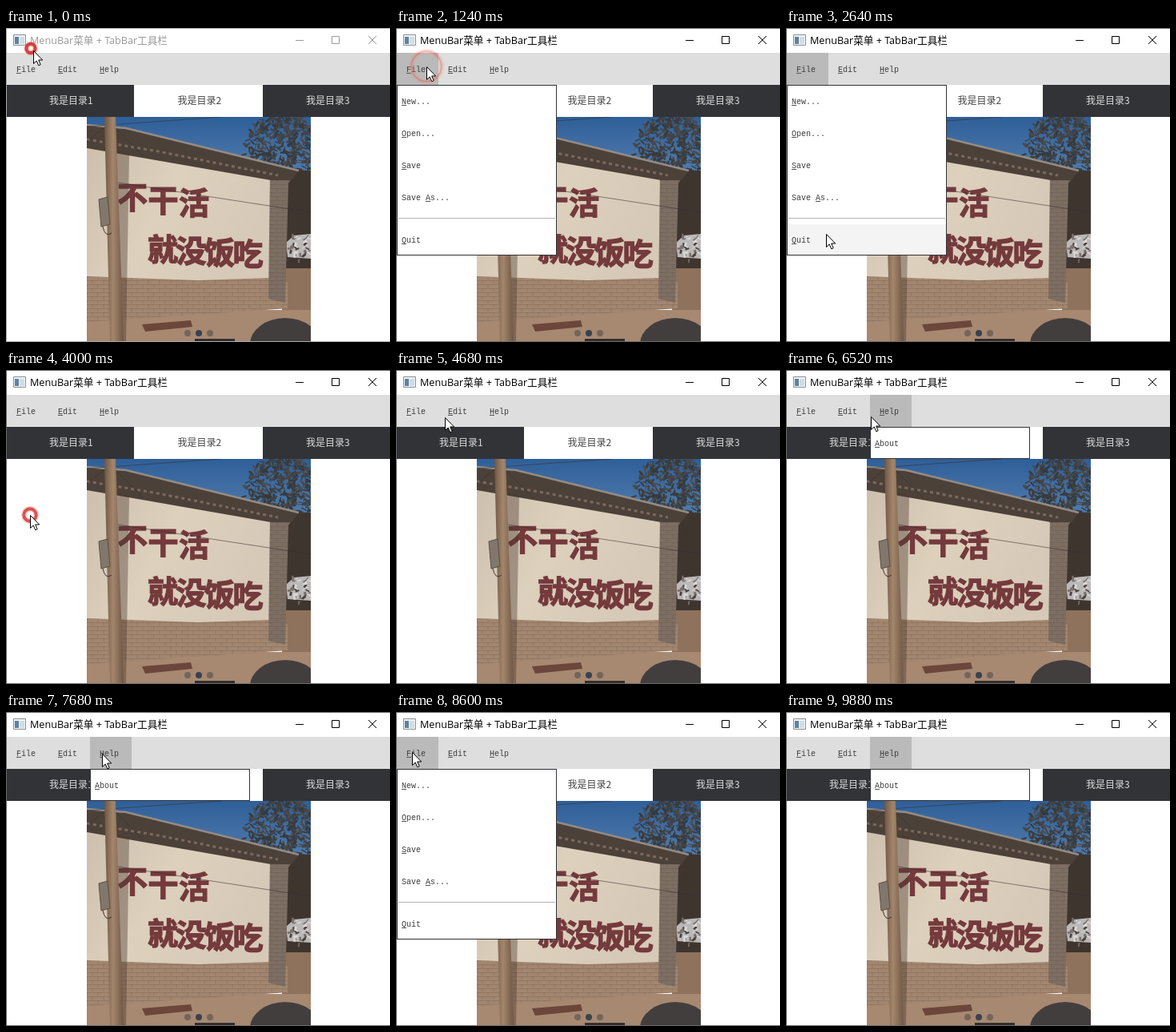
Write an HTML page that moves like this. It is 480 by 392 pixels and loops after 10000 ms.

```html
<!DOCTYPE html>
<html lang="zh">
<head>
<meta charset="utf-8">
<title>MenuBar + TabBar</title>
<style>
  html, body { margin: 0; height: 100%; overflow: hidden; background: #fff; }
  svg { display: block; width: 100vw; height: 100vh; }
  text { white-space: pre; }
  .title { font: 12.6px "Open Sans", "Noto Sans CJK SC", sans-serif; }
  .mono { font: 10px "Liberation Mono", monospace; fill: #3c3c3c; }
  .tab { font: 12px "Noto Sans CJK SC", sans-serif; }
  .slogan {
    font: 900 38px "Noto Sans CJK SC", sans-serif; text-anchor: middle;
    fill: #743a3c; stroke: #743a3c; stroke-width: 1.4;
  }
</style>
</head>
<body>
<svg viewBox="0 0 480 392">
  <defs>
    <linearGradient id="sky" x2="0" y2="1">
      <stop stop-color="#2f5f99"/><stop offset="1" stop-color="#5a84b3"/>
    </linearGradient>
    <linearGradient id="plaster" x2="1" y2=".4">
      <stop stop-color="#cdbfad"/><stop offset=".5" stop-color="#ddd0bd"/><stop offset="1" stop-color="#d6c9b7"/>
    </linearGradient>
    <linearGradient id="wood">
      <stop stop-color="#6f5644"/><stop offset=".45" stop-color="#a3866b"/><stop offset="1" stop-color="#6f5644"/>
    </linearGradient>
    <pattern id="brick" width="14" height="10" patternUnits="userSpaceOnUse">
      <path d="M0 .5H14M0 5.5H14M3 0V5M10 5V10" stroke="#5c4636" stroke-opacity=".22" fill="none"/>
    </pattern>
    <clipPath id="frame"><path d="M101 111H381V391H101Z"/></clipPath>
  </defs>

  <rect width="480" height="392" fill="#fff"/>

  <g clip-path="url(#frame)">
    <path d="M101 111H381V201H101Z" fill="url(#sky)"/>
    <g id="tree" fill="none"></g>
    <path d="M330 178H381V330H330Z" fill="#3f352f"/>
    <path d="M345 300H381V391H345Z" fill="#8f725c"/>
    <path d="M350 268L360 259 381 257V288L352 286Z" fill="#bbb8b8"/>
    <g id="rubble" fill="none"></g>
    <path d="M101 352H381V391H101Z" fill="#a78871"/>
    <path d="M101 309H330L352 318V350L101 367Z" fill="#a2866f"/>
    <path d="M101 309H330L352 318V350L101 367Z" fill="url(#brick)"/>
    <path d="M101 145L331 187 329 312 240 315 101 310Z" fill="url(#plaster)"/>
    <path d="M330 184L362 180 353 194 349 343 328 338Z" fill="#7d6e63"/>
    <path d="M330 184L362 180 353 194 349 343 328 338Z" fill="url(#brick)"/>
    <path d="M101 122L150 126 366 178 357 190H331L101 150Z" fill="#4c4139"/>
    <path d="M101 121L150 125 366 178" fill="none" stroke="#958b83" stroke-width="2.5"/>
    <path d="M101 139L190 154 340 184" fill="none" stroke="#7b695d" stroke-width="3" stroke-dasharray="4 4"/>
    <g id="slogan"></g>
    <path d="M138 152L154 156 150 391H143Z" fill="#4a392e" fill-opacity=".4"/>
    <path d="M101 123L270 111M101 142L126 122M138 126L172 160M140 193L381 230" fill="none" stroke="#33302f" stroke-width=".8" stroke-opacity=".7"/>
    <path d="M123 111H137L147 391H130Z" fill="url(#wood)"/>
    <path d="M116 214L127 211 130 245 119 248Z" fill="#82776c" stroke="#5b4f46"/>
    <path d="M121 248Q124 262 132 256" fill="none" stroke="#3c3531"/>
    <path d="M170 370L231 365 233 373 174 379Z" fill="#6b463a"/>
    <path d="M236 388H286V391H236Z" fill="#332e2d"/>
    <ellipse cx="349" cy="395" rx="44" ry="33" fill="#433e3e"/>
  </g>
  <g id="dots"></g>
  <g id="bar"></g>
  <g id="popups"></g>

  <g fill="none">
    <path id="edge" d="M0 .5H480M.5 0V392M0 391.5H480"/>
    <path id="buttons" d="M362 15.5H372M407.5 10.5H416.5V19.5H407.5ZM453 10L463 20M463 10L453 20"/>
  </g>
  <path d="M9.5 8.5H24.5V21.5H9.5Z" fill="#f0f3f5" stroke="#8b9197"/>
  <path d="M11 11H16V20H11Z" fill="#5c82a3"/>
  <path d="M17 11H23V20H17Z" fill="#d3dce2"/>
  <text id="title" class="title" x="30" y="20">MenuBar菜单 + TabBar工具栏</text>

  <g id="ring">
    <circle id="glow" stroke="#f08a70" stroke-width="7"/>
    <circle id="core" stroke="#d03838" fill="none"/>
  </g>
  <path id="cursor" d="M.5 .5V16.5L4.2 13 6.8 18.8 9.2 17.7 6.7 12H11.7Z" fill="#fff" stroke="#000"/>
</svg>
<script>
const LOOP = 10000, STEP = 20, RING_MS = 380;
const BAR_Y = 31, ROW = 40, HEAD_W = 52, POPUP_W = 200;
const $ = id => document.getElementById(id);

function set(el, attrs) {
  for (const key in attrs) el.setAttribute(key, attrs[key]);
  return el;
}

function add(parent, tag, attrs, text = '') {
  const el = set(document.createElementNS('http://www.w3.org/2000/svg', tag), attrs);
  el.textContent = text;
  parent.append(el);
  return el;
}

const box = (parent, x, y, width, height, fill) =>
  add(parent, 'rect', { x, y, width, height, fill });

// "&" marks the underlined letter
function label(parent, x, mid, text) {
  const at = text.indexOf('&');
  add(parent, 'text', { x, y: mid + 4, class: 'mono' }, text.replace('&', ''));
  if (at >= 0) box(parent, x + at * 6, mid + 5, 6, 1, '#555');
}

// Photo details: seeded strokes in an ellipse, lettering, pager dots
let seed = 7;
const random = () => (seed = seed * 16807 % 2147483647) / 2147483647;

function scatter(parent, count, cx, cy, rx, ry, length, colours) {
  for (let i = 0; i < count; i++) {
    const a = random() * 2 * Math.PI, r = Math.sqrt(random()), b = random() * 2 * Math.PI;
    const x = cx + rx * r * Math.cos(a), y = cy + ry * r * Math.sin(a);
    add(parent, 'path', {
      d: `M${x} ${y}l${length * Math.cos(b)} ${length * Math.sin(b)}`,
      stroke: colours[i % colours.length], 'stroke-width': 1 + 2 * random()
    });
  }
}
scatter($('tree'), 420, 347, 148, 48, 40, 7, ['#353a3e', '#424448', '#4b4a48', '#3a3c3b']);
scatter($('rubble'), 40, 368, 274, 16, 16, 5, ['#dad7d5', '#77706c', '#4a413c']);

function paint(text, x, y, step, drop) {
  [...text].forEach((char, i) =>
    add($('slogan'), 'text', { x: x + i * step, y: y + i * drop, class: 'slogan' }, char));
}
paint('不干活', 158, 225, 38.5, 3.5);
paint('就没饭吃', 196, 290, 35.5, 2);

for (let i = 0; i < 3; i++)
  add($('dots'), 'circle', { cx: 227 + i * 14, cy: 381, r: 4, fill: i === 1 ? '#39424e' : '#74645a' });

// Menu bar, tabs and popups
box($('bar'), 1, BAR_Y, 479, ROW, '#dedede');
for (let i = 0; i < 3; i++) {
  const on = i === 1, x = Math.max(1, i * 161 - 1);
  box($('bar'), x, BAR_Y + ROW, 162, ROW, on ? '#fff' : '#323337');
  add($('bar'), 'text', { x: 54 + i * 160.5, y: 95, class: 'tab', fill: on ? '#444' : '#dcdcdc' }, '我是目录' + (i + 1));
}

const MENUS = [
  { name: '&File', items: ['&New...', '&Open...', '&Save', 'Save &As...', '-', '&Quit'] },
  { name: '&Edit', items: ['Cut', 'Copy', 'Paste'] },
  { name: '&Help', items: ['&About'] }
];

MENUS.forEach((menu, i) => {
  const x = 1 + i * HEAD_W, top = BAR_Y + ROW;
  menu.head = box($('bar'), x, BAR_Y, HEAD_W, ROW, '#bababa');
  label($('bar'), x + 12, BAR_Y + ROW / 2, menu.name);

  const g = menu.popup = add($('popups'), 'g', {});
  const frame = set(box(g, x + .5, top + .5, POPUP_W - 1, 0, '#fff'), { stroke: '#323337' });
  menu.rows = [];
  let y = top;
  for (const item of menu.items) {
    if (item === '-') {
      box(g, x + 2, y + 6, POPUP_W - 4, 1, '#b5b5b5');
      y += 13;
    } else {
      menu.rows.push({ x, y, el: box(g, x + 1, y + 1, POPUP_W - 2, ROW - 2, '#f4f4f4') });
      label(g, x + 6, y + ROW / 2, item);
      y += ROW;
    }
  }
  set(frame, { height: y - top - 1 });
});

// Pointer stops: time, x, y
const PATH = [
  [0, 34, 28], [900, 38, 48], [1300, 38, 48], [2700, 50, 258], [3800, 30, 181], [4050, 30, 181],
  [4800, 63, 50], [4900, 63, 50], [5200, 90, 105], [5850, 95, 166], [6520, 106, 58],
  [7000, 138, 88], [7500, 130, 52], [8500, 20, 50], [8650, 20, 50], [9400, 126, 48],
  [9800, 130, -22], [LOOP, 130, -22]
];
const CLICKS = [[0, 31, 25.5], [1000, 38, 48], [3960, 30, 181], [4860, 63, 50]];

function cursorAt(t) {
  const i = PATH.findIndex(p => p[0] > t);
  const [t0, x0, y0] = PATH[i - 1], [t1, x1, y1] = PATH[i];
  const u = (t - t0) / (t1 - t0), k = u * u * (3 - 2 * u);
  return [x0 + (x1 - x0) * k, y0 + (y1 - y0) * k];
}

// A click opens the heading under the pointer or closes; an open menu follows the pointer
const openAt = [];
for (let t = 0, open = -1; t < LOOP; t += STEP) {
  const [x, y] = cursorAt(t);
  const inBar = y >= BAR_Y && y < BAR_Y + ROW;
  const over = inBar ? Math.floor((x - 1) / HEAD_W) : -1;
  if (CLICKS.some(c => c[0] === t) || (open >= 0 && over >= 0)) open = over;
  openAt.push(open);
}

const show = (el, on) => set(el, { display: on ? 'inline' : 'none' });

function drawRing(t) {
  const [start, cx, cy] = CLICKS.filter(c => c[0] <= t).pop();
  const p = Math.min(1, (t - start) / RING_MS), r = 5.5 + 21 * p;
  show($('ring'), p < 1);
  set($('glow'), { cx, cy, r, 'stroke-opacity': .4 * (1 - .8 * p), fill: `rgba(255,255,255,${Math.max(0, .9 - 4 * p)})` });
  set($('core'), { cx, cy, r, 'stroke-width': 4.2 - 3 * p, 'stroke-opacity': .95 * (1 - p) ** 1.3 });
}

function draw(t) {
  const active = t >= 80, open = openAt[Math.floor(t / STEP)];
  const [x, y] = cursorAt(t);
  set($('title'), { fill: active ? '#000' : '#999' });
  set($('buttons'), { stroke: active ? '#000' : '#999' });
  set($('edge'), { stroke: active ? '#6a6a6a' : '#a8a8a8' });
  MENUS.forEach((menu, i) => {
    show(menu.head, i === open);
    show(menu.popup, i === open);
    for (const row of menu.rows)
      show(row.el, x > row.x && x < row.x + POPUP_W && y >= row.y && y < row.y + ROW);
  });
  drawRing(t);
  set($('cursor'), { transform: `translate(${Math.round(x)} ${Math.round(y)})` });
}

const begin = performance.now();
function tick() {
  draw((performance.now() - begin) % LOOP);
  requestAnimationFrame(tick);
}
tick();
</script>
</body>
</html>
```
